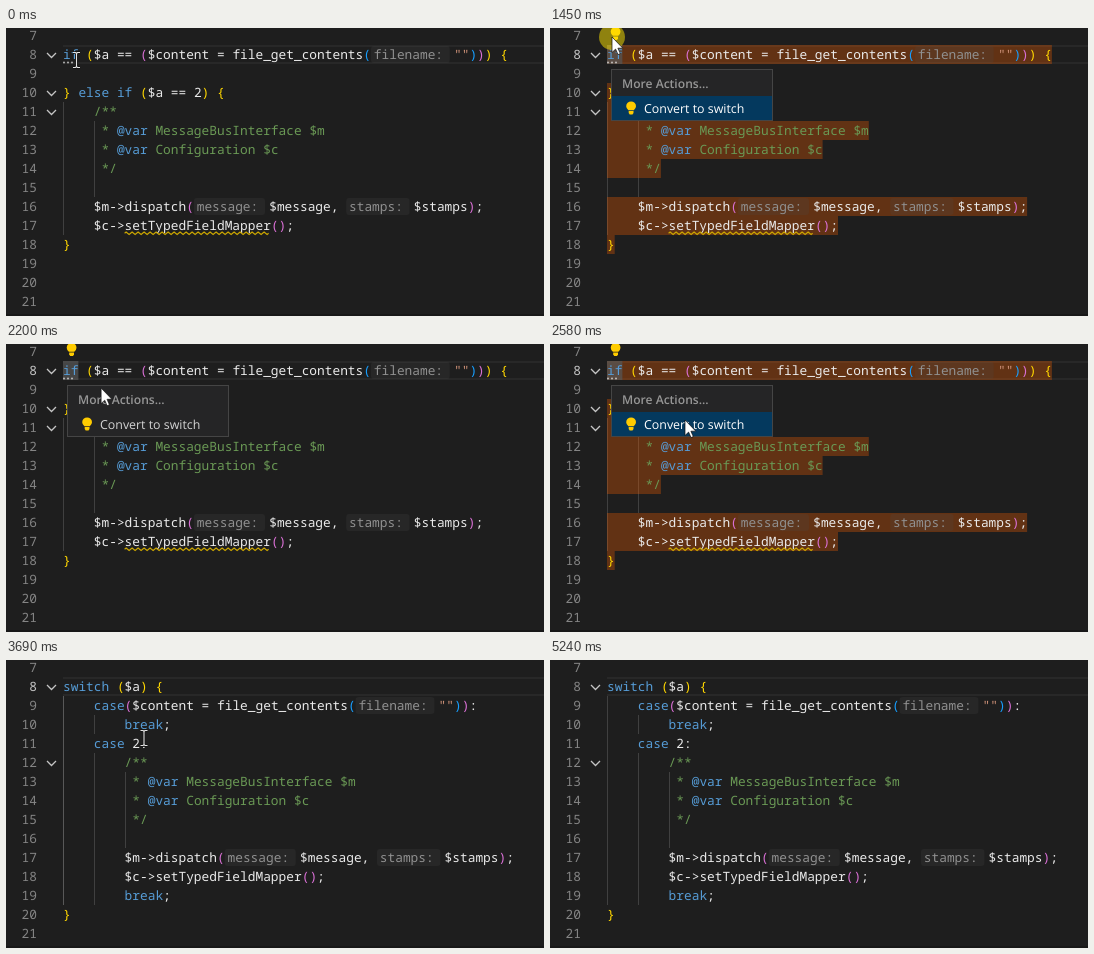
An HTML page that plays this animation: 538 by 288 pixels, repeating every 7290 ms.

```html
<!DOCTYPE html>
<html lang="en">
<head>
<meta charset="utf-8">
<title>Convert to switch</title>
<style>
  html, body { margin: 0; width: 100%; height: 100%; overflow: hidden; background: #1e1e1e; }
  svg { display: block; width: 538px; height: 288px; }
  text { white-space: pre; text-rendering: geometricPrecision; }
  .mono { font: 500 12.83px "Noto Sans Mono", "DejaVu Sans Mono", monospace; }
  .menu { font: 500 12.4px "Open Sans", "Noto Sans", sans-serif; }
</style>
</head>
<body>
<svg id="stage" viewBox="0 0 538 288">
  <defs>
    <g id="bulb">
      <path d="M60.7 3.8a4.9 4.9 0 1 1 9.8 0q0 2.2-2.2 4h-5.4q-2.2-1.8-2.2-4z" fill="#fc0"/>
      <path d="M63.2 8.4h4.8v2.2l-1 1.4h-2.8l-1-1.4z" fill="#fc0"/>
    </g>
    <path id="beam" d="M-3.5-7.5h2.5l1 1 1-1h2.5M0-6.5v13M-3.5 7.5h2.5l1-1 1 1h2.5"/>
  </defs>
  <rect width="538" height="288" fill="#1e1e1e"/>
  <rect y="286" width="538" height="2" fill="#181818"/>
  <path d="M57 18h481M57 35h481" stroke="#282828" stroke-width="2"/>
  <g id="ifGuides"></g>
  <g id="switchGuides"></g>
  <g id="range" fill="rgba(234,92,0,.333)"></g>
  <g id="marks" fill="rgba(87,87,87,.72)">
    <rect x="57" y="17" width="15.4" height="19"/>
    <rect x="72.4" y="55" width="30.8" height="19"/>
  </g>
  <g id="numbers" class="mono" text-anchor="end" fill="#858585"></g>
  <g id="folds" fill="none" stroke="#c5c5c5" stroke-width="1.3"></g>
  <g id="before" class="mono"></g>
  <g id="after" class="mono"></g>
  <rect id="caret" y="17" width="2" height="19" fill="#aeafad"/>
  <use id="hint" href="#bulb"/>
  <g id="menu" class="menu">
    <rect x="61.5" y="41.5" width="161" height="51" fill="#252526" stroke="#454545"/>
    <text x="72" y="60" fill="#969696" font-weight="600" font-size="12.1">More Actions...</text>
    <rect id="focus" x="62" y="68" width="160" height="24" fill="#04395e"/>
    <use href="#bulb" x="15.5" y="74.5"/>
    <text id="action" x="94" y="85">Convert to switch</text>
  </g>
  <g id="mouse">
    <circle id="click" r="13" fill="rgba(255,230,0,.5)"/>
    <g id="ibeam" fill="none" transform="translate(3 2)">
      <use href="#beam" stroke="#111" stroke-width="2.6"/>
      <use href="#beam" stroke="#e4e4e4" stroke-width="1.1"/>
    </g>
    <path id="hand" fill="#fff" stroke="#111" stroke-width=".8"
      d="M.5 2a1.7 1.7 0 0 1 3.4 0v6l5 1.3q1.6.6 1.4 3l-.8 5.2q-.3 1.6-1.2 2.6v2.2H.5v-2.2l-4-6q-1-2 .3-2.6 1.3-.4 2.5 1l1.2 1.3z"/>
    <path id="arrow" fill="#fff" stroke="#111" stroke-width=".7"
      d="M0 0v15.5l3.6-3.4 2.4 5.5 2.3-1-2.4-5.4h4.9z"/>
  </g>
</svg>
<script>
const LOOP = 7290, LEFT = 57, CELL = 7.7;
const $ = id => document.getElementById(id);
const rowTop = row => 17 + 19 * (row - 8);

function add(parent, tag, attrs, text) {
  const el = document.createElementNS('http://www.w3.org/2000/svg', tag);
  for (const k in attrs) el.setAttribute(k, attrs[k]);
  if (text) el.textContent = text;
  parent.append(el);
  return el;
}

// Code lines start at row 8; [label:] marks an inlay hint.
const ifCode = [
  'if ($a == ($content = file_get_contents([filename:]""))) {',
  '',
  '} else if ($a == 2) {',
  '    /**',
  '     * @var MessageBusInterface $m',
  '     * @var Configuration $c',
  '     */',
  '',
  '    $m->dispatch([message:]$message, [stamps:]$stamps);',
  '    $c->setTypedFieldMapper();',
  '}'
];
const switchCode = [
  'switch ($a) {',
  '    case($content = file_get_contents([filename:]"")):',
  '        break;',
  '    case 2:',
  ...ifCode.slice(3, 10).map(s => '    ' + s),
  '        break;',
  '}'
];

const bracketColors = ['#ffd700', '#da70d6', '#179fff'];
const keyword = /^(if|else|switch|case|break)$/;
const token = /\[[^\]]+\]|[(){}]|[;:,]|[^\s()[\]{};:,]+/g;

// Returns the x at which each line ends.
function drawCode(g, lines) {
  let depth = 0;
  return lines.map((line, i) => {
    const y = rowTop(8 + i), comment = /^\s*(\/\*|\*)/.test(line);
    let shift = LEFT;
    for (const m of line.matchAll(token)) {
      const s = m[0], x = m.index * CELL + shift;
      if (s[0] === '[') {
        const label = s.slice(1, -1);
        add(g, 'rect', {
          x, y: y + 1, width: label.length * CELL + 9.5, height: 17, rx: 3,
          fill: 'rgba(77,77,77,.2)'
        });
        add(g, 'text', { x: x + 2.8, y: y + 14, fill: '#909090' }, label);
        shift += 6 - CELL;
        continue;
      }
      let fill = '#eaeaea';
      if (comment) fill = s[0] === '@' ? '#569cd6' : '#6a9955';
      else if ('({'.includes(s)) fill = bracketColors[depth++ % 3];
      else if (')}'.includes(s)) fill = bracketColors[--depth % 3];
      else if (keyword.test(s)) fill = '#569cd6';
      else if (s[0] === '"') fill = '#ce9178';
      add(g, 'text', { x, y: y + 14, fill }, s);
    }
    return shift + line.length * CELL;
  });
}

function guide(g, col, from, to) {
  return add(g, 'rect', {
    x: Math.round(LEFT + col * CELL), y: rowTop(from), width: 1,
    height: 19 * (to - from + 1), fill: '#404040'
  });
}

guide($('ifGuides'), 0, 11, 17);
guide($('ifGuides'), 4, 12, 15);
const scopeGuide = guide($('switchGuides'), 0, 9, 19);
guide($('switchGuides'), 4, 10, 10);
guide($('switchGuides'), 4, 12, 19);
guide($('switchGuides'), 8, 13, 16);

drawCode($('before'), ifCode).forEach((end, i) => add($('range'), 'rect', {
  x: LEFT, y: rowTop(8 + i), width: end - LEFT, height: 19
}));
drawCode($('after'), switchCode);

// Warning squiggle and suggestion dots
add($('before'), 'path', {
  d: 'M118.6 205.3' + 'l1.5-1.3 1.5 0 1.5 2.2 1.5 0'.repeat(0) + 'l1.5-1.2l3 2.4l1.5-1.2'.repeat(24),
  fill: 'none', stroke: '#cca700', 'stroke-width': 1.2
}).setAttribute('d', 'M118.6 205.3' + 'l1.5-1.2l3 2.4l1.5-1.2'.repeat(24));
for (const x of [58, 62, 66])
  add($('before'), 'circle', { cx: x, cy: 34.5, r: 1, fill: 'rgba(238,238,238,.7)' });

const numbers = {}, folds = {};
for (let n = 7; n <= 21; n++)
  numbers[n] = add($('numbers'), 'text', { x: 31, y: rowTop(n) + 14 }, String(n));
for (const n of [8, 10, 11, 12])
  folds[n] = add($('folds'), 'path', { d: `M41 ${rowTop(n) + 8}l4.5 4.5 4.5-4.5` });

// Mouse hot spot: time, x, y
const path = [
  [0, 67.5, 30], [580, 67.5, 30], [1140, 62, 9], [1860, 62, 9],
  [2200, 95, 44], [2580, 135, 76], [4260, 135, 76],
  [4500, 223, 161], [4750, 360, 272], [LOOP, 360, 272]
];
const carets = [[120, 620], [1120, 1380], [3210, 3690], [4180, 4680], [5170, 5240]];
const clicks = [[120, 180], [1320, 1500], [3080, 3210]];

const during = (t, spans) => spans.some(([a, b]) => t >= a && t < b);
const show = (id, on) => {
  const el = typeof id === 'string' ? $(id) : id;
  el.style.display = on ? '' : 'none';
};

function mouseAt(t) {
  const i = path.findIndex(p => p[0] > t), [t0, x0, y0] = path[i - 1], [t1, x1, y1] = path[i];
  const k = (t - t0) / (t1 - t0);
  return [x0 + (x1 - x0) * k, y0 + (y1 - y0) * k];
}

function render(t) {
  const done = t >= 3260, open = t >= 1380 && t < 3210;
  const focus = during(t, [[1380, 2150], [2480, 3210]]);
  const active = t >= 120 && t < 5240;
  const [x, y] = mouseAt(t);

  show('before', !done);
  show('ifGuides', !done);
  show('after', done);
  show('switchGuides', done);
  show('marks', t >= 370 && !done);
  show('hint', t >= 370 && !done);
  show('menu', open);
  show('focus', focus);
  show('range', focus);
  $('action').setAttribute('fill', focus ? '#fff' : '#d4d4d4');

  show(folds[8], !done || t >= 3460);
  show(folds[10], t < 3460);
  show(folds[11], !done);
  show(folds[12], done);
  numbers[8].setAttribute('fill', active ? '#c6c6c6' : '#858585');
  scopeGuide.setAttribute('fill', active ? '#585858' : '#404040');

  show('caret', during(t, carets));
  $('caret').setAttribute('x', done ? 102 : 64);

  show('mouse', t < 4800);
  $('mouse').setAttribute('transform', `translate(${x} ${y})`);
  const hand = !open && y < 17;
  show('hand', hand);
  show('arrow', open);
  show('ibeam', !open && !hand);
  show('click', during(t, clicks));
}

const start = performance.now();
function tick() {
  render((performance.now() - start) % LOOP);
  requestAnimationFrame(tick);
}
tick();
</script>
</body>
</html>
```
